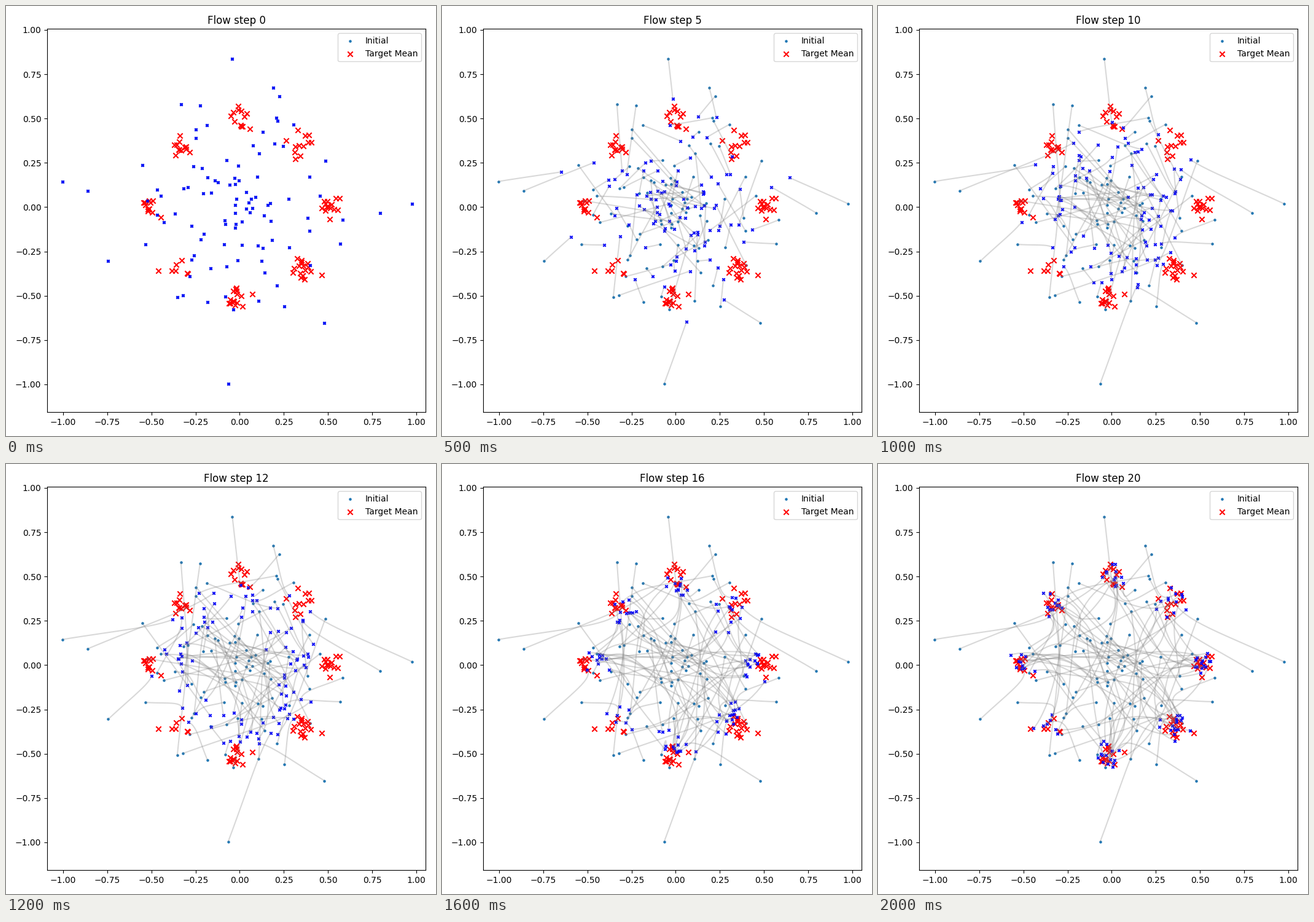
A matplotlib script for the animation above (2.1 s loop, 700 by 700 pixels).

```python
import numpy as np
import matplotlib.pyplot as plt
from matplotlib.animation import FuncAnimation
from matplotlib.collections import LineCollection

STEPS = 20
RADIUS = 0.5
rng = np.random.default_rng(8)

# Particles that start far out: x, y and the cluster each one flows to.
OUTER = np.array([
    (-1.005, 0.145, 3), (-0.860, 0.093, 2), (-0.745, -0.305, 4),
    (-0.065, -0.995, 7), (0.480, -0.652, 6), (0.975, 0.020, 1),
    (0.795, -0.032, 1), (-0.042, 0.838, 2), (0.190, 0.675, 1),
    (0.225, 0.627, 2), (-0.333, 0.582, 5), (-0.225, 0.572, 5),
])
# Remaining particles per cluster, counter-clockwise from the right.
COUNTS = [14, 9, 9, 11, 10, 5, 14, 16]


def polar(r, angle):
    return np.column_stack([r * np.cos(angle), r * np.sin(angle)])


def noise(size, sd):
    return rng.normal(0, sd, size)


n = sum(COUNTS)
inner = polar(rng.permutation(np.linspace(0.03, 0.62, n)), rng.uniform(0, 2 * np.pi, n))
start = np.vstack([OUTER[:, :2], inner])
cluster = np.concatenate([OUTER[:, 2], np.repeat(np.arange(8), COUNTS)])
target = polar(RADIUS, cluster * np.pi / 4) + noise(start.shape, 0.034)
end = target + noise(start.shape, 0.022)
bend = np.concatenate([np.zeros(len(OUTER)), noise(n, 0.12)])


def flow(t):
    """Positions at time t: ease out to the end, drawn inwards and bent sideways."""
    eased = 1 - (1 - t) ** 1.75
    arc = np.sin(np.pi * t)
    way = end - start
    side = np.column_stack([-way[:, 1], way[:, 0]])
    return (start + eased * way) * (1 - 0.15 * arc) + arc * bend[:, None] * side


paths = np.stack([flow(s / STEPS) for s in range(STEPS + 1)], axis=1)

fig, ax = plt.subplots(figsize=(7, 7), dpi=100)
ax.scatter(*start.T, s=5, label="Initial")
ax.scatter(*target.T, color="red", marker="x", label="Target Mean")
now = ax.scatter(*start.T, s=10, color="blue", marker="x")
trails = ax.add_collection(
    LineCollection([], colors="gray", alpha=0.3, linewidths=1.5), autolim=False)
title = ax.set_title("Flow step 0")
ax.set(xlim=(-1.0905, 1.0525), ylim=(-1.157, 1.0055))
ax.legend(loc="upper right")
fig.tight_layout()


def update(step):
    now.set_offsets(paths[:, step])
    trails.set_segments(paths[:, :step + 1] if step else [])
    title.set_text(f"Flow step {step}")
    return now, trails, title


anim = FuncAnimation(fig, update, frames=STEPS + 1, interval=100,
                     init_func=lambda: update(0), repeat=True, repeat_delay=0)
plt.show()
```
